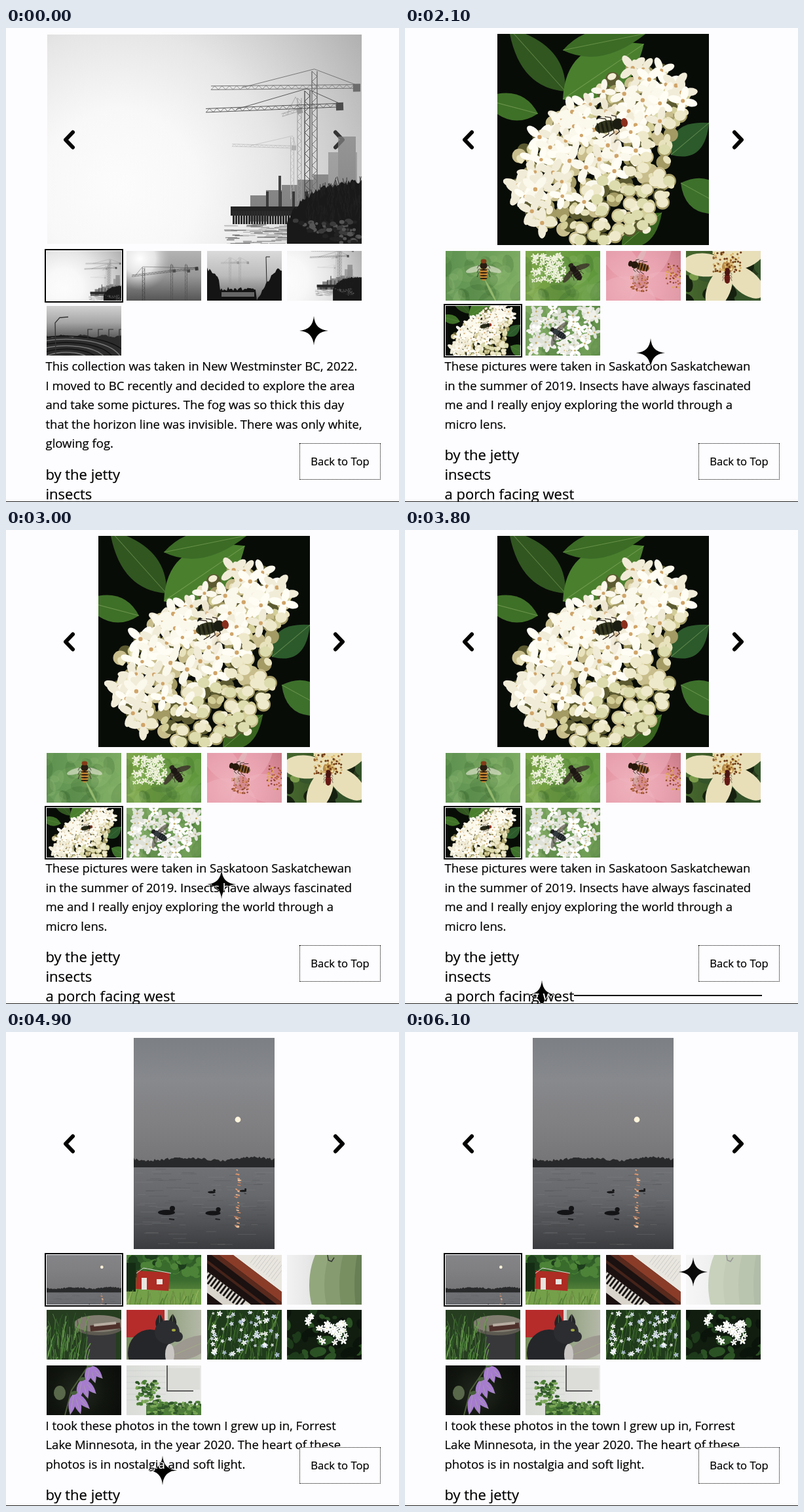
An HTML page with a canvas for the animation above (6200 ms loop, 600 by 725 pixels).

```html
<!DOCTYPE html>
<html lang="en">
<head>
<meta charset="utf-8">
<title>Photo collections</title>
<style>
html, body { margin: 0; width: 100%; height: 100%; overflow: hidden; background: #fdfcfe; }
#stage { position: absolute; left: 0; top: 0; width: 600px; height: 725px; overflow: hidden; isolation: isolate;
  background: #fdfcfe; color: #000; font-family: "Open Sans", sans-serif; -webkit-text-stroke: .2px; }
#stage > *, section > * { position: absolute; }
section { inset: 0; }
p { margin: 0; left: 60.5px; font-size: 18.5px; line-height: 29.6px; white-space: pre; }
.link { left: 60.5px; width: 484.5px; height: 30px; display: flex; align-items: center;
  font-size: 22px; line-height: 30px; white-space: pre; }
.link i { flex: 1; height: 2px; background: #000; visibility: hidden; }
.link.on i { visibility: inherit; }
.picked { outline: 2px solid #000; outline-offset: 1px; }
#top { left: 448px; top: 635px; width: 122px; height: 54px; border: 1px dotted #000; background: #fdfcfe;
  font-size: 16.65px; line-height: 54px; text-align: center; }
#edge { left: 0; top: 724px; width: 600px; height: 1px; background: #222; }
svg { left: 0; top: 0; mix-blend-mode: difference; }
.arrow { fill: none; stroke: #fff; stroke-width: 6; stroke-linecap: round; stroke-linejoin: round; }
</style>
</head>
<body>
<div id="stage">
  <div id="top">Back to Top</div>
  <div id="edge"></div>
  <svg width="600" height="725" fill="#fff">
    <path class="arrow" d="M102 159.500L91 171L102 182.500"/>
    <path class="arrow" d="M503 159.500L514 171L503 182.500"/>
    <path id="star" d="M0-22.500Q1.500-1.500 22 0Q1.500 1.500 0 22.500Q-1.500 1.500-22 0Q-1.500-1.500 0-22.500Z"/>
  </svg>
</div>
<script>
// ---- drawing helpers ----
let g, seed;
const rnd = () => (seed = (seed * 16807) % 2147483647) / 2147483647;
const spread = r => (rnd() * 2 - 1) * r;
const pick = (...a) => a[Math.floor(rnd() * a.length)];
const W = 114, H = 76;

const stops = (gr, colors) => (colors.forEach((c, i) => gr.addColorStop(i / (colors.length - 1), c)), gr);
const down = (h, ...c) => stops(g.createLinearGradient(0, 0, 0, h), c);
const across = (w, ...c) => stops(g.createLinearGradient(0, 0, w, 0), c);
const glow = (x, y, r, ...c) => stops(g.createRadialGradient(x, y, 0, x, y, r), c);
const fill = (paint, x = 0, y = 0, w = 600, h = 400) => { g.fillStyle = paint; g.fillRect(x, y, w, h); };

function oval(paint, x, y, rx, ry = rx, turn = 0) {
  g.beginPath(); g.ellipse(x, y, rx, ry, turn, 0, 7); g.fillStyle = paint; g.fill();
}
function line(color, width, ...p) {
  g.beginPath();
  for (let i = 0; i < p.length; i += 2) g.lineTo(p[i], p[i + 1]);
  g.strokeStyle = color; g.lineWidth = width; g.stroke();
}
function spray(n, x, y, w, h, fn) {
  for (let i = 0; i < n; i++) fn(x + rnd() * w, y + rnd() * h, rnd());
}
function at(x, y, turn, fn) {
  g.save(); g.translate(x, y); g.rotate(turn); fn(); g.restore();
}
// Solid ground below the curve y = top(x)
function ridge(paint, x1, x2, top) {
  g.beginPath(); g.moveTo(x1, 500);
  for (let x = x1; x <= x2; x += 2) g.lineTo(x, top(x));
  g.lineTo(x2, 500); g.fillStyle = paint; g.fill();
}
function leaf(paint, x, y, len, wide, turn) {
  at(x, y, turn, () => {
    g.beginPath(); g.moveTo(0, 0);
    g.quadraticCurveTo(len * .4, -wide, len, 0); g.quadraticCurveTo(len * .4, wide, 0, 0);
    g.fillStyle = paint; g.fill();
    line('#a9c97a66', 1, 0, 0, len, 0);
  });
}
function bloom(x, y, r, paint, core, n = 5, turn = rnd() * 6) {
  for (let i = 0; i < n; i++) {
    const a = turn + i * 2 * Math.PI / n;
    oval(paint, x + Math.cos(a) * r * .55, y + Math.sin(a) * r * .55, r * .5, r * .27, a);
  }
  oval(core, x, y, r * .14);
}
function blades(n, y, ...colors) {
  spray(n, -5, y, W + 10, H - y + 8, (a, b, r) => line(pick(...colors), .5 + r, a, b + 14, a + r * 3, b, a + r * 14 - 5, b - 10));
}
const dapple = (n, size, ...colors) =>
  spray(n, 0, 0, W, H, (x, y, r) => oval(pick(...colors), x, y, size * (.4 + r), size * (.3 + r * .5), r * 3));

// ---- foggy harbour ----
function lattice(color, w, len) {
  const zig = [];
  for (let d = 0, s = w / 2; d <= len; d += w, s = -s) zig.push(d, s);
  line(color, w / 6, 0, -w / 2, len, -w / 2);
  line(color, w / 6, 0, w / 2, len, w / 2);
  line(color, w / 8, ...zig);
}
function crane(color, x, y, left, right, foot, w, tilt = -.04) {
  at(x, y - w * 3, Math.PI / 2, () => lattice(color, w, foot + w * 3));
  at(x, y, tilt, () => {
    g.translate(-left, 0);
    lattice(color, w * .7, left + right);
    line(color, w / 9, left * .3, 0, left, -w * 3.4, left + right, 0);
    fill(color, left + right - w * 1.4, -w * .5, w * 1.4, w * 1.5);
  });
}
function harbour() {
  fill(glow(110, 235, 480, '#fcfcfc', '#f8f8f8', '#e6e6e6', '#c6c6c6', '#a4a4a4'));
  for (let i = 0; i < 5; i++) fill(down(340, '#aaa', '#777'), 310 + i * 24, 246 - i * 8, 26, 40);
  fill(down(230, '#b5b5b5', '#9c9c9c'), 429, 180, 44, 60);
  fill(down(230, '#a8a8a8', '#8c8c8c'), 444, 156, 27, 90);
  crane('#b0b0b0', 374, 172, 92, 6, 80, 5, .03);
  crane('#999', 385, 115, 28, 4, 140, 6, -.3);
  crane('#6c6c6c', 408, 80, 158, 70, 185, 8, -.01);
  crane('#4c4c4c', 397, 110, 155, 55, 155, 8);
  for (let x = 334; x < 400; x += 20) fill('#3a3a3a', x, 240, 4, 30);
  fill('#444', 353, 216, 4, 50);
  fill('#242424', 280, 263, 140, 14);
  for (let x = 283; x < 400; x += 4) fill('#2b2b2b', x, 270, 3, 20);
  spray(80, 270, 291, 120, 30, (x, y, r) => line(pick('#777', '#999', '#bbb'), 1.5, x, y, x + 10 + r * 18, y));
  const bank = x => 222 + 64 * Math.exp((366 - x) / 34);
  ridge('#191919', 366, 600, x => bank(x) + spread(4));
  spray(150, 395, 0, 85, 60, (x, y, r) => line('#222', .8, x, bank(x) + y, x + r * 8 - 4, bank(x) + y - 12));
  spray(110, 375, 284, 105, 36, (x, y, r) => y < 120 + x * .45 && oval(pick('#222', '#3b3b3b', '#555'), x, y, 2 + r * 4, 2 + r * 2));
}
function harbourNear() {
  g.scale(.285, .285); g.translate(-120, -82);
  harbour();
}
function sunCrane() {
  fill(down(H, '#b3b3b3', '#979797', '#555'));
  fill(glow(20, 12, 48, '#fff', '#eeed', '#bbb0'));
  crane('#383838', 26, 36, 18, 84, 50, 3.5, -.12);
  for (const x of [69, 91]) crane('#4c4c4c', x, 30, 4, 6, 50, 3);
}
function roadside() {
  fill(down(H, '#dadada', '#bbb', '#666'));
  for (const x of [35, 50]) crane('#9a9a9a', x, 18, 14, 14, 40, 2.5);
  ridge('#141414', 0, W, x => 58 - 30 * Math.cos(x / W * 6.3) * (x < 20 || x > 74) + spread(3));
  fill('#666', 22, 63, 50, 7);
  line('#222', 1, 91, 50, 90, 9, 96, 9);
}
function highway() {
  fill(down(H, '#d2d2d2', '#a6a6a6', '#555', '#222'));
  ridge('#2c2c2c', 0, W, x => 46 + Math.sin(x * .2) * 2 + spread(1));
  for (let i = 0; i < 7; i++) {
    g.beginPath(); g.ellipse(30, 84, 24 + i * 12, 8 + i * 5, 0, 3.5, 7);
    g.strokeStyle = i % 2 ? '#777' : '#111'; g.lineWidth = 1.5; g.stroke();
  }
  line('#333', 1.3, 14, H, 13, 26, 20, 18, 33, 17);
  for (let x = 63; x < W; x += 16) line('#333', 1.2, x, 50, x, 36, x + 7, 36);
}

// ---- insects ----
function meadow(...colors) {
  fill(across(W, ...colors));
  dapple(40, 16, '#a6c98530', '#34602a38', '#8bb56a30');
}
function bug(x, y, s, turn, body, stripe, head, wing) {
  at(x, y, turn, () => {
    g.scale(s, s);
    for (const side of [-1, 1]) {
      oval(wing, side * 12, -1, 13, 4, side * .3);
      for (let i = 0; i < 3; i++) line('#2a2018', .7, 0, i * 3 - 4, side * 7, i * 5 - 6, side * 9, i * 6 - 2);
    }
    oval(body, 0, 5, 5.5, 10);
    for (let i = 0; i < 4; i++) oval(stripe, 0, i * 4, 5, 1);
    oval(stripe, 0, -6, 5, 5); oval(head, 0, -12, 4, 3);
  });
}
function hoverfly() {
  meadow('#5d9150', '#7cab62');
  leaf('#8fb56a', 60, 44, 42, 4, 1.1);
  bug(58, 29, 1.1, 0, '#c98a34', '#2a1d10', '#853b18', '#e0e4cfaa');
}
function beefly() {
  meadow('#7da548', '#5d963b');
  spray(75, 12, 6, 48, 40, (x, y, r) => bloom(x, y, 3 + r * 2, '#f0f3df', '#c4c66a', 4));
  bug(76, 32, 1, -.6, '#29221c', '#1b1612', '#29221c', '#3d352bdd');
}
function bee() {
  fill(glow(40, 50, 90, '#eeb0b8', '#e595a4', '#c97a86'));
  bloom(52, 46, 80, '#efb4c080', '#d58a8f');
  spray(60, 92, 20, 22, 36, (x, y) => oval(pick('#b65a3a', '#e1a65b', '#8d4030'), x, y, 1.3));
  spray(60, 38, 38, 26, 24, (x, y) => oval(pick('#b5673d', '#d88d6a', '#8f4a30'), x, y, 1.2));
  bug(50, 23, 1.1, -1.3, '#8a5b2a', '#28190d', '#28190d', '#d9c9c470');
}
function ant() {
  fill(across(W, '#47692e', '#25361a'));
  dapple(22, 16, '#7b9c4b', '#16200f', '#35542a');
  bloom(64, 24, 66, '#e8dfb9', '#b98b45', 5, .7);
  spray(110, 42, 2, 42, 30, (x, y) => oval(pick('#6f3c17', '#d7b46c', '#95602b', '#efdda4'), x, y, 1.6));
  bug(63, 38, .8, 0, '#7b1f18', '#4b1511', '#4b1511', '#0000');
}
const inCluster = (x, y) => Math.hypot((x - 148) / 120, (y - 212) / 108) < 1 || Math.hypot(x - 222, y - 114) < 66;
function cluster() {
  fill('#080c07');
  leaf('#315620', 104, 88, 130, 50, -2.3);
  leaf('#4a7f2e', 100, 100, 150, 80, -.6);
  leaf('#3b6b25', 100, 25, 130, 40, -.2);
  leaf('#3f7028', 62, 122, 90, 40, 3.4);
  leaf('#2c5a2b', 265, 185, 76, 44, -.7);
  leaf('#3d702b', 280, 228, 90, 50, .5);
  leaf('#38641f', 190, 325, 80, 40, -.7);
  const spots = [];
  for (let y = 55; y < 318; y += 17) for (let x = 30; x < 290; x += 17) {
    const a = x + spread(7), b = y + spread(7);
    if (inCluster(a, b)) spots.push([a, b, rnd()]);
  }
  for (const [x, y] of spots) oval(pick('#5c5a30', '#a39a64', '#c8bd8c'), x, y, 11);
  for (const [x, y] of spots) oval(pick('#e8e2bd', '#f4eed6', '#d3cd98'), x + spread(9), y + spread(9), 7, 5, rnd() * 3);
  for (const [x, y, r] of spots) {
    if (x + y > 350 + r * 120) oval(pick('#efe9cb', '#dcdcae'), x, y, 9, 8);
    else if (r < .55) bloom(x, y, 18 + r * 10, pick('#fbf8ec', '#f1ecd8', '#fffdf4'), '#d0a468', 4);
  }
  bug(174, 140, 1.7, 1.35, '#34371f', '#1c1d12', '#8b2f1d', '#e9ddc570');
}
function blackFly() {
  meadow('#7fa864', '#5b8b45');
  spray(60, 8, 4, 100, 66, (x, y, r) => bloom(x, y, 7 + r * 5, pick('#fff', '#f0f0ea', '#dfe2d8'), '#c6b06c', 4));
  bug(50, 42, .9, -1, '#1c2022', '#333a3e', '#222', '#55514aaa');
}

// ---- lake town ----
function duck(x, y, s) {
  oval('#141416', x, y, 13 * s, 4 * s); oval('#141416', x + 9 * s, y - 6 * s, 4 * s);
  line('#1c1c1e', 2 * s, x + 4 * s, y + 10 * s, x + 12 * s, y + 11 * s);
}
function lake() {
  fill(down(198, '#7c7f84', '#87898d', '#807f81', '#747375'));
  ridge('#28292a', 0, 216, x => 185 + Math.sin(x * .06) * 2 + spread(2));
  fill(down(323, '#888', '#888', '#76787c', '#66686c', '#3a3b3e'), 0, 198);
  spray(110, 0, 199, 190, 120, (x, y, r) => line(pick('#8886', '#4445'), .7, x, y, x + 8 + r * 22, y));
  oval('#fff4dc', 159, 125, 4.4);
  spray(32, 153, 200, 6, 90, (x, y, r) => line(pick('#e9a578', '#f5c9a4', '#c98460'), 1.5, x, y, x + 2 + r * 4, y + 1));
  duck(50, 267, 1); duck(121, 268, .9); duck(119, 236, .45); duck(167, 234, .4);
}
function barn() {
  fill(down(H, '#2c5726', '#3b6b2e', '#76a04a'));
  spray(60, 0, 0, W, 30, (x, y, r) => oval(pick('#1d3d1c', '#386b2c', '#4c8338'), x, y, 3 + r * 6));
  fill('#74a04a', 0, 52); fill('#152c14', 0, 12, 14, 44);
  at(16, 24, .06, () => fill('#ad2c23', 0, 0, 50, 28));
  line('#ddd', 1, 15, 28, 26, 20, 68, 28);
  fill('#e8e5df', 23, 35, 8, 18); fill('#e8e5df', 46, 37, 9, 8);
  blades(60, 62, '#547f35', '#97b560', '#6f8f45');
}
function piano() {
  fill('#1a1110');
  at(0, 0, .65, () => {
    fill('#e9e6df', 30, -80, 140, 56);
    for (let x = 60; x < 110; x += 5) line('#bbb', .6, x, -60, x, -30);
    fill('#8a3c28', 0, -24, 140, 13); fill('#5a2a1e', 0, -11, 140, 7); fill('#45231a', 0, 6, 140, 4);
    fill('#dad5cc', 0, 20, 140, 26);
    for (let x = 14; x < 90; x += 6) fill('#171414', x, 20, 3, 15);
  });
}
function umbrella() {
  fill(across(60, '#f2f2f2', '#dcdedc'));
  for (let i = 0; i < 4; i++) oval(['#93a77d', '#869b70', '#788f62', '#687f55'][i], 84 + i * 14, 46, 50 - i * 9, 80);
  line('#333', 1.5, 62, 0, 63, 8, 68, 10, 72, 4);
}
function garden() {
  fill('#263d20');
  fill('#38383a', 60, 30, 46, 46);
  oval('#5c5950', 80, 25, 38, 14); oval('#817c70', 80, 21, 38, 13);
  at(66, 22, -.1, () => { fill('#4e302b', 0, 2, 46, 9); fill('#b7aca1', 6, 0, 34, 4); });
  g.translate(-56, 0); blades(200, 14, '#4b7f3a', '#6a9b4f', '#2c5325');
}
function cat() {
  fill(across(W, '#768c5a', '#8fa07c', '#b4b8a8'));
  fill('#b52c2b', 0, 0, 60, 42); fill('#d8d4cf', 58, 0, 5, 34);
  leaf('#9d9890', 60, 74, 90, 30, -.4);
  oval('#252629', 36, 66, 34, 36); oval('#c9c6c4', 66, 68, 7, 16);
  for (const x of [50, 70]) leaf('#232427', x, 32, 26, 12, -1.55);
  oval('#2c2d31', 62, 34, 19, 18); oval('#2c2d31', 77, 41, 9, 8);
  oval('#a3a83e', 72, 31, 3, 2);
}
function speckled() {
  fill('#1f3a1b');
  blades(170, 4, '#3c6a2c', '#5a8a3c', '#2a4f22');
  spray(60, 4, 2, 106, 68, (x, y, r) => bloom(x, y, 2 + r * 2.5, pick('#dfe8f3', '#fff', '#b9c8df'), '#8da3c4'));
}
function darkBlooms() {
  fill('#101d0f');
  dapple(45, 9, '#1d3a1a', '#2b5224', '#0b140a');
  spray(30, 48, 20, 46, 30, (x, y, r) => bloom(x, y, 4 + r * 2, '#fff', '#d5d48a'));
  spray(4, 24, 8, 18, 12, (x, y) => bloom(x, y, 5, '#fff', '#d5d48a'));
}
function bells() {
  fill(glow(50, 40, 80, '#222a1f', '#11150f', '#080a08'));
  oval('#59684a', 20, 42, 9, 11);
  line('#4d5d39', 2, 28, H, 38, 38, 64, 0);
  for (let i = 0; i < 3; i++) at(66 - i * 12, i * 21, -.3, () => {
    for (const a of [1.1, 1.57, 2.05]) leaf('#a67ccf', 0, 0, 28 + i * 3, 11, a);
    oval('#47603a', 0, 0, 5, 3);
  });
}
function wall() {
  fill(across(W, '#dadcd8', '#e8e9e6'));
  for (let y = 8; y < 60; y += 9) line('#c8cac6', .6, 0, y, 60, y);
  fill('#dcdcd9', 62, 4, 50, 33); line('#333', 1.5, 62, 0, 62, 39, 102, 39);
  const vine = (x, y, r) => oval(pick('#4e8038', '#79a656', '#31582a'), x, y, 1.5 + r * 2.5, 2);
  spray(85, 16, 24, 34, 36, vine);
  ridge('#4f7a3b', 30, W, x => 60 + spread(4));
  spray(110, 34, 56, 80, 20, vine);
}

// ---- pages ----
const thumbs = (...draws) => draws.map(draw => ({ draw, w: W, h: H }));
const pages = [
  { photos: [{ draw: harbour, w: 480, h: 320 }, ...thumbs(sunCrane, roadside, harbourNear, highway)],
    text: ['This collection was taken in New Westminster BC, 2022.', 'I moved to BC recently and decided to explore the area',
      'and take some pictures. The fog was so thick this day', 'that the horizon line was invisible. There was only white,', 'glowing fog.'] },
  { photos: [...thumbs(hoverfly, beefly, bee, ant), { draw: cluster, w: 323, h: 323 }, ...thumbs(blackFly)],
    text: ['These pictures were taken in Saskatoon Saskatchewan', 'in the summer of 2019. Insects have always fascinated',
      'me and I really enjoy exploring the world through a', 'micro lens.'] },
  { photos: [{ draw: lake, w: 215, h: 323 },
      ...thumbs(barn, piano, umbrella, garden, cat, speckled, darkBlooms, bells, wall)],
    text: ['I took these photos in the town I grew up in, Forrest', 'Lake Minnesota, in the year 2020. The heart of these',
      'photos is in nostalgia and soft light.'] }
];
const titles = ['by the jetty', 'insects', 'a porch facing west'];
const stage = document.getElementById('stage'), star = document.getElementById('star');

function add(parent, tag, top, text = '') {
  const el = document.createElement(tag);
  el.textContent = text;
  el.style.top = top + 'px';
  return parent.appendChild(el);
}
function print(parent, { draw, w, h }, x, y, width, height) {
  const el = add(parent, 'canvas', y), k = Math.max(width / w, height / h);
  el.style.left = x + 'px';
  el.width = width; el.height = height;
  g = el.getContext('2d');
  g.translate((width - w * k) / 2, (height - h * k) / 2);
  g.scale(k, k);
  seed = 4242;
  draw();
  return el;
}
for (const page of pages) {
  page.el = document.createElement('section');
  stage.prepend(page.el);
  page.thumbs = page.photos.map((p, i) => {
    const x = Math.round(62 + 122.4 * (i % 4)), y = Math.floor(341 + 84.5 * Math.floor(i / 4));
    return { x, y, el: print(page.el, p, x, y, W, H) };
  });
  const top = 333 + 84.5 * Math.ceil(page.photos.length / 4);
  add(page.el, 'p', top, page.text.join('\n'));
  page.linkTop = top + page.text.length * 29.6 + 16.7;
  page.links = titles.map((t, i) => {
    const el = add(page.el, 'div', page.linkTop + i * 30, t);
    el.className = 'link';
    el.append(document.createElement('i'));
    return el;
  });
}

// ---- timeline ----
const LOOP = 6200, STEP = 100;
// start time, page, chosen photo
const views = [[0, 0, 0], [1500, 1, 0], [1800, 1, 4], [4900, 2, 0]].map(([from, n, chosen]) => {
  const page = pages[n], p = page.photos[chosen], k = Math.min(480 / p.w, 323 / p.h);
  const w = Math.round(p.w * k), h = Math.round(p.h * k);
  return { from, page, chosen, main: print(page.el, p, Math.round(302.5 - w / 2), Math.floor(170.5 - h / 2), w, h) };
});
// The pointer's stops: time, x, y
const path = [
  [0, 470, 463], [200, 511, 550], [400, 350, 597], [600, 191, 400], [750, 270, 246], [1300, 134, 711], [1500, 134, 711],
  [1700, 119, 463], [2100, 375, 497], [2800, 350, 497], [3000, 329, 542], [3500, 210, 698], [3700, 209, 711],
  [4800, 209, 711], [5300, 359, 508], [6100, 440, 367], [LOOP, 440, 367]
];
function pointer(t) {
  const i = path.findIndex(k => k[0] > t), [t1, x1, y1] = path[i - 1], [t2, x2, y2] = path[i], u = (t - t1) / (t2 - t1);
  return [x1 + (x2 - x1) * u, y1 + (y2 - y1) * u];
}
function show(t) {
  const [x, y] = pointer(t), view = views.findLast(v => v.from <= t), { page } = view;
  star.setAttribute('transform', `translate(${x} ${y})`);
  for (const p of pages) p.el.style.visibility = p === page ? 'visible' : 'hidden';
  for (const v of views) v.main.style.visibility = v === view ? 'inherit' : 'hidden';
  page.thumbs.forEach((th, i) => {
    const over = x >= th.x && x < th.x + W && y >= th.y && y < th.y + H;
    th.el.className = i === view.chosen ? 'picked' : '';
    th.el.style.opacity = over ? .5 : 1;
  });
  const row = Math.floor((y - page.linkTop) / 30);
  page.links.forEach((el, i) => el.classList.toggle('on', i === row && x > 60 && x < 545));
}
const start = performance.now();
function tick() {
  const t = (performance.now() - start) % LOOP;
  show(Math.floor(t / STEP) * STEP);
  requestAnimationFrame(tick);
}
tick();
</script>
</body>
</html>
```
